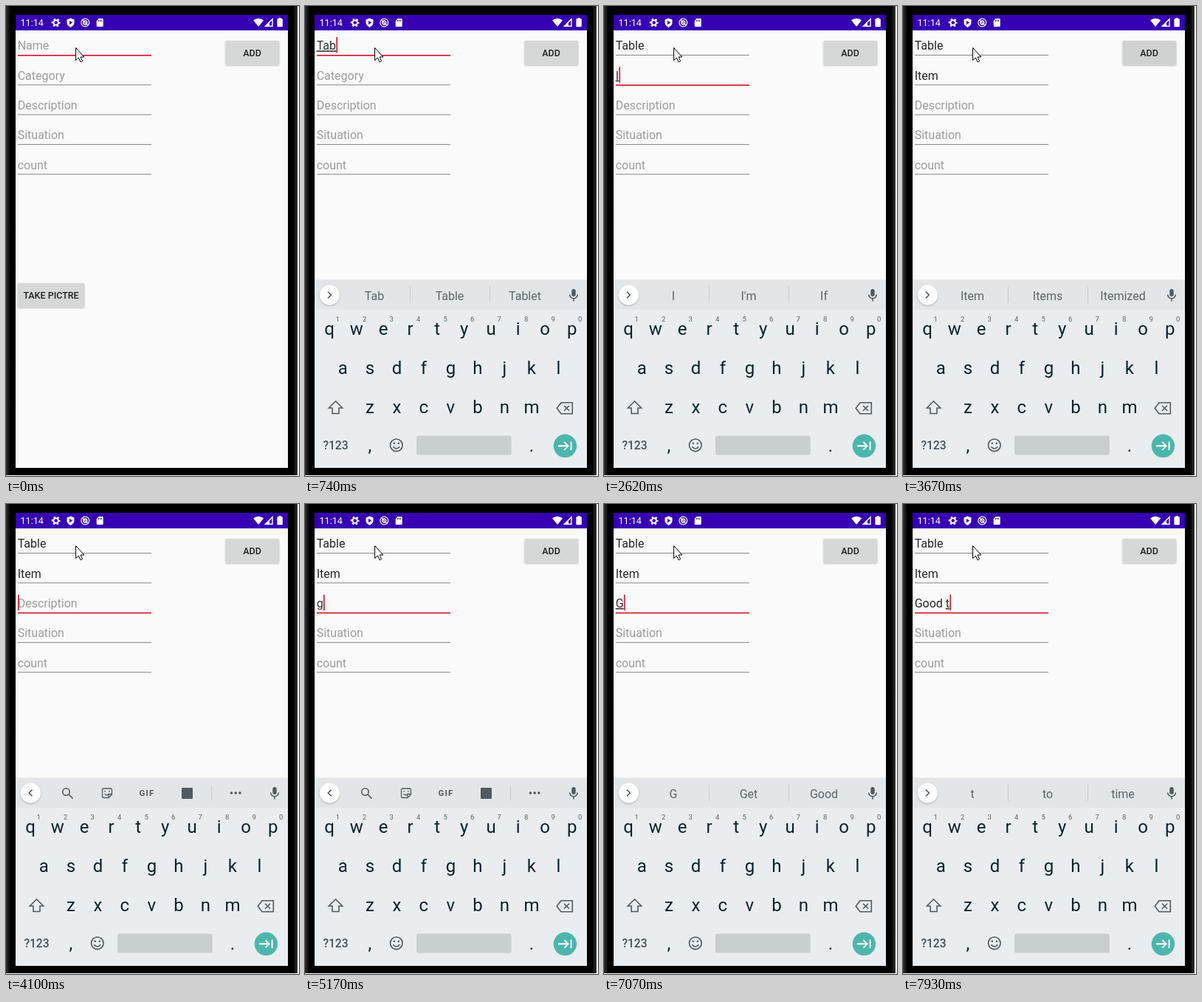
These frames come from a looping animation (397 by 636 pixels, 8 s). An HTML page:

```html
<!DOCTYPE html>
<html lang="en">
<head>
<meta charset="utf-8">
<title>Add item form</title>
<style>
  html, body { margin: 0; width: 100%; height: 100%; overflow: hidden; background: #000; }
  svg { display: block; width: 397px; height: 636px; font-family: Roboto, sans-serif; }
  text { white-space: pre; }
  .mid { text-anchor: middle; }
  .field { font-size: 16px; fill: #262626; }
  .field.hint { fill: #9c9c9c; }
  .field .composing { fill: #333; text-decoration: underline 1px #666; text-decoration-skip-ink: none; }
  .line { fill: #868686; }
  .focused { fill: #dc1a30; }
  .button { font-size: 12.5px; font-weight: 500; fill: #212121; text-anchor: middle; }
  .key { font-size: 24px; fill: #0c222b; text-anchor: middle; }
  .digit { font-size: 9.5px; fill: #59646b; text-anchor: middle; }
  .word { font-size: 16px; fill: #5c656b; text-anchor: middle; }
  .icon { fill: none; stroke: #505a60; stroke-width: 1.6; }
  .thin { stroke-width: 1.3; }
  .solid { fill: #505a60; }
</style>
</head>
<body>
<svg viewBox="0 0 397 636">
  <defs>
    <linearGradient id="edge">
      <stop offset="0" stop-color="#333"/>
      <stop offset=".45" stop-color="#1c1c1c"/>
      <stop offset="1" stop-color="#000"/>
    </linearGradient>
    <filter id="shadow" x="-10%" y="-20%" width="120%" height="150%">
      <feDropShadow dx="0" dy="1" stdDeviation=".9" flood-opacity=".3"/>
    </filter>
    <clipPath id="screen"><rect x="13" y="12" width="369" height="613"/></clipPath>
  </defs>

  <rect width="397" height="636" fill="#fff"/>
  <rect width="395" height="635"/>
  <rect width="6" height="635" fill="url(#edge)"/>
  <rect width="6" height="635" fill="url(#edge)" transform="matrix(-1 0 0 1 395 0)"/>

  <g clip-path="url(#screen)">
    <rect x="13" y="12" width="369" height="613" fill="#fafafa"/>
    <rect x="13" y="12" width="369" height="21" fill="#3700b3"/>

    <g id="status" fill="#fff">
      <text x="19.5" y="27.2" font-size="12.6">11:14</text>
      <g fill="none" stroke="#fff" transform="translate(67.7 22.5)">
        <circle r="3.3" stroke-width="2"/>
        <circle r="5" stroke-width="1.8" stroke-dasharray="2.6 2.636" stroke-dashoffset="1.3"/>
      </g>
      <path d="M87.5 16.5l5 2v4q0 4-5 6.4q-5-2.4-5-6.4v-4z"/>
      <path d="M86 19.8v5.4l4.2-2.7z" fill="#3700b3"/>
      <g fill="none" stroke="#fff" stroke-width="1.2" transform="translate(107.3 22.5)">
        <circle r="5.4"/>
        <circle r="2.4" stroke-width="1.5"/>
        <path d="M-3.8 -3.8L3.5 3.5"/>
      </g>
      <path d="M125.5 17h5.2q1 0 1 1v9q0 1-1 1h-7q-1 0-1-1v-7z"/>
      <path d="M125.5 19v2M127.5 19v2M129.5 19v2" stroke="#3700b3"/>
      <path d="M335 19.3q7.2-5 14.2 0L342.1 28z"/>
      <path d="M351.4 27.3L361 17.7V27.3z" fill="none" stroke="#fff" stroke-width="1.4"/>
      <path d="M351 27.8l6-6v6z"/>
      <path d="M369.6 17.2v-1.3h3v1.3h1.2q1 0 1 1v9q0 1-1 1h-5.4q-1 0-1-1v-9q0-1 1-1z"/>
    </g>

    <rect id="add" x="297.5" y="47" width="72.5" height="32.5" rx="1.5" filter="url(#shadow)"/>
    <text class="button" x="333.5" y="68.2">ADD</text>
    <rect x="16" y="375" width="90" height="32.5" rx="1.5" fill="#d6d7d7" filter="url(#shadow)"/>
    <text class="button" x="61" y="395.8">TAKE PICTRE</text>

    <g id="fields"></g>
    <rect id="caret" width="1.7" height="21.5" class="focused"/>

    <path d="M94.6 56.5V73.6L98.4 70L101.1 75.8L103.6 74.6L101 69H105.9z" fill="#fff" stroke="#000" stroke-linejoin="round"/>

    <g id="keyboard">
      <rect x="13" y="370" width="369" height="1" fill="#ebedee"/>
      <rect x="13" y="371" width="369" height="254" fill="#e9edf0"/>
      <rect x="13" y="371" width="369" height="40" fill="#e2e6e8"/>
      <circle cx="33.4" cy="391" r="13.5" fill="#fff" filter="url(#shadow)"/>
      <path id="chevron" class="icon"/>

      <g id="words">
        <path d="M142.5 380v22M250.5 380v22" stroke="#c6cbce"/>
      </g>

      <g id="tools">
        <circle class="icon" cx="81.5" cy="389.5" r="4.7"/>
        <path class="icon" d="M85 393l5.6 5.6"/>
        <path class="icon thin" d="M132.5 385h9q2 0 2 2v6l-4.5 4.5h-6.5q-2 0-2-2v-8.5q0-2 2-2zM143.5 392.5h-4.500v5M133.500 392q2 3 5 1"/>
        <path class="solid" d="M133.500 388h1.500v1.500h-1.500zM139 388h1.500v1.500h-1.500z"/>
        <text class="mid solid" x="191" y="395" font-size="11.5" font-weight="700" letter-spacing="1.2">GIF</text>
        <rect class="solid" x="238" y="384" width="15" height="15" rx="1"/>
        <path d="M278.5 381v20" stroke="#c6cbce"/>
        <path d="M305.5 391h.01M311.2 391h.01M316.9 391h.01" stroke="#505a60" stroke-width="3.6" stroke-linecap="round"/>
      </g>

      <rect class="solid" x="361.3" y="383" width="5.4" height="10" rx="2.7"/>
      <path class="icon" d="M358.7 390.5a5.3 5.3 0 0 0 10.6 0M364 396v3.5"/>

      <g id="keys"></g>
      <path class="icon" d="M41.5 534.8L50.7 544H46v7.5H37V544H32.3z"/>
      <path class="icon" d="M347 536.8h15.3v15H347l-5.800-7.500zM351 540.800l7 7M358 540.800l-7 7"/>
      <text class="mid" x="41.5" y="600" font-size="15.6" font-weight="500" fill="#46525a">?123</text>
      <g transform="translate(123.8 594.3)">
        <circle class="icon" r="8.3"/>
        <path class="icon" d="M-4.5 2q4.5 5.5 9 0"/>
        <path d="M-3 -2.5h.01M3 -2.5h.01" stroke="#505a60" stroke-width="2.6" stroke-linecap="round"/>
      </g>
      <rect x="151" y="581.5" width="128.7" height="26" rx="2.5" fill="#c9ced1"/>
      <circle cx="352.4" cy="595.3" r="15.7" fill="#4db6ac"/>
      <path d="M343 595.3h13M351.3 590l5.3 5.3l-5.3 5.3M360.6 589.5v11.6" fill="none" stroke="#fff" stroke-width="1.9"/>
    </g>
  </g>
</svg>
<script>
const LOOP = 8000;
const ROW_PITCH = 40.3;
const TEXT_X = 15.7;
const KEY_PITCH = 36.5;
const KEY_CENTER = 197.4;
const HINTS = ['Name', 'Category', 'Description', 'Situation', 'count'];
const ENTERED = ['Table', 'Item'];
const TOOLS = 'tools';

// [start ms, focused row, typed text, caret visible, suggestion strip, keyboard offset]
// A half row means that the focus rests on the ADD button.
const STEPS = [
  [0, 0, '', false, null],
  [130, 0, '', true, null],
  [440, 0, 'T', true, TOOLS, 40],
  [740, 0, 'Tab', true, 'Tab Table Tablet'],
  [890, 0, 'Tabl', true, 'Tabl Table Tablet'],
  [1330, 0, 'Table', true, 'Table Tables Tablet'],
  [1770, 1, '', true, 'Table Tables Tablet'],
  [1920, 1, '', true, TOOLS],
  [2200, 1, '', false, TOOLS],
  [2620, 1, 'I', true, "I I'm If"],
  [2770, 1, 'It', true, "It It's Its"],
  [2920, 1, 'Ite', true, 'Ite Item Items'],
  [3080, 1, 'Item', true, 'Item Items Itemized'],
  [3520, 1.5, '', false, 'Item Items Itemized'],
  [3960, 2, '', true, 'Item Items Itemized'],
  [4100, 2, '', true, TOOLS],
  [4400, 2, '', false, TOOLS],
  [4870, 2, '', true, TOOLS],
  [5170, 2, 'g', true, TOOLS],
  [5320, 2, 'go', true, 'go good got'],
  [5600, 2, 'good', true, 'good goods god'],
  [6060, 2, 'goo', true, 'goo good goods'],
  [6200, 2, 'go', true, 'go good got'],
  [6350, 2, 'g', true, 'g get good'],
  [6500, 2, '', true, 'g get good'],
  [6640, 2, '', true, TOOLS],
  [7070, 2, 'G', true, 'G Get Good'],
  [7220, 2, 'Go', true, 'Go Good Got'],
  [7360, 2, 'Goo', true, 'Goo Good Goods'],
  [7500, 2, 'Good', true, 'Good Goods Goodness'],
  [7800, 2, 'Good ', true, 'luck morning job'],
  [7930, 2, 'Good t', true, 't to time']
];

const byId = id => document.getElementById(id);

function add(parent, tag, attributes, content = '') {
  const node = document.createElementNS('http://www.w3.org/2000/svg', tag);
  for (const name in attributes) node.setAttribute(name, attributes[name]);
  node.textContent = content;
  return parent.appendChild(node);
}

const fields = HINTS.map((hint, row) => {
  const y = row * ROW_PITCH;
  const text = add(byId('fields'), 'text', { x: TEXT_X, y: 59.3 + y });
  return {
    hint,
    text,
    fixed: add(text, 'tspan', {}),
    composing: add(text, 'tspan', { class: 'composing' }),
    line: add(byId('fields'), 'rect', { x: 16, y: 66 + y, width: 181 })
  };
});

const words = [94, 196, 298].map(x => add(byId('words'), 'text', { class: 'word', x, y: 397.5 }));

const keyX = column => KEY_CENTER + KEY_PITCH * column;
const addKey = (label, x, y) => add(byId('keys'), 'text', { class: 'key', x, y }, label);

['qwertyuiop', 'asdfghjkl', 'zxcvbnm'].forEach((letters, row) => {
  [...letters].forEach((letter, i) => {
    const x = keyX(i - (letters.length - 1) / 2);
    addKey(letter, x, 445 + 53 * row);
    if (row === 0) add(byId('keys'), 'text', { class: 'digit', x: x + 11, y: 427.3 }, (i + 1) % 10);
  });
});
addKey(',', keyX(-3), 602.5);
addKey('.', keyX(3), 602.5);

function show(node, visible) {
  node.style.display = visible ? '' : 'none';
}

function drawField(field, row, focusRow, typed) {
  const focused = row === focusRow;
  const value = focused ? typed : row < focusRow ? ENTERED[row] : '';
  const split = focused ? value.lastIndexOf(' ') + 1 : value.length;
  field.fixed.textContent = value ? value.slice(0, split) : field.hint;
  field.composing.textContent = value.slice(split);
  field.text.setAttribute('class', value ? 'field' : 'field hint');
  field.line.setAttribute('class', focused ? 'focused' : 'line');
  field.line.setAttribute('height', focused ? 1.7 : 1);
}

function draw([, row, typed, caretOn, strip, offset = 0]) {
  fields.forEach((field, i) => drawField(field, i, row, typed));

  const caret = byId('caret');
  show(caret, caretOn);
  if (caretOn) {
    const width = typed ? fields[row].text.getComputedTextLength() : 0;
    caret.setAttribute('x', TEXT_X + width + 0.3);
    caret.setAttribute('y', 42 + row * ROW_PITCH);
  }

  byId('add').setAttribute('fill', row % 1 ? '#d0d2d1' : '#d6d7d7');
  show(byId('keyboard'), strip);
  byId('keyboard').setAttribute('transform', `translate(0 ${offset})`);

  const tools = strip === TOOLS;
  show(byId('tools'), tools);
  show(byId('words'), !tools);
  byId('chevron').setAttribute('d', tools ? 'M35.5 386.7l-4.3 4.3l4.3 4.3' : 'M31 386.7l4.3 4.3l-4.3 4.3');
  if (strip && !tools) strip.split(' ').forEach((word, i) => { words[i].textContent = word; });
}

let current;
function tick() {
  const time = performance.now() % LOOP;
  const step = STEPS.findLast(([start]) => start <= time);
  if (step !== current) draw(current = step);
  requestAnimationFrame(tick);
}
tick();
</script>
</body>
</html>
```
